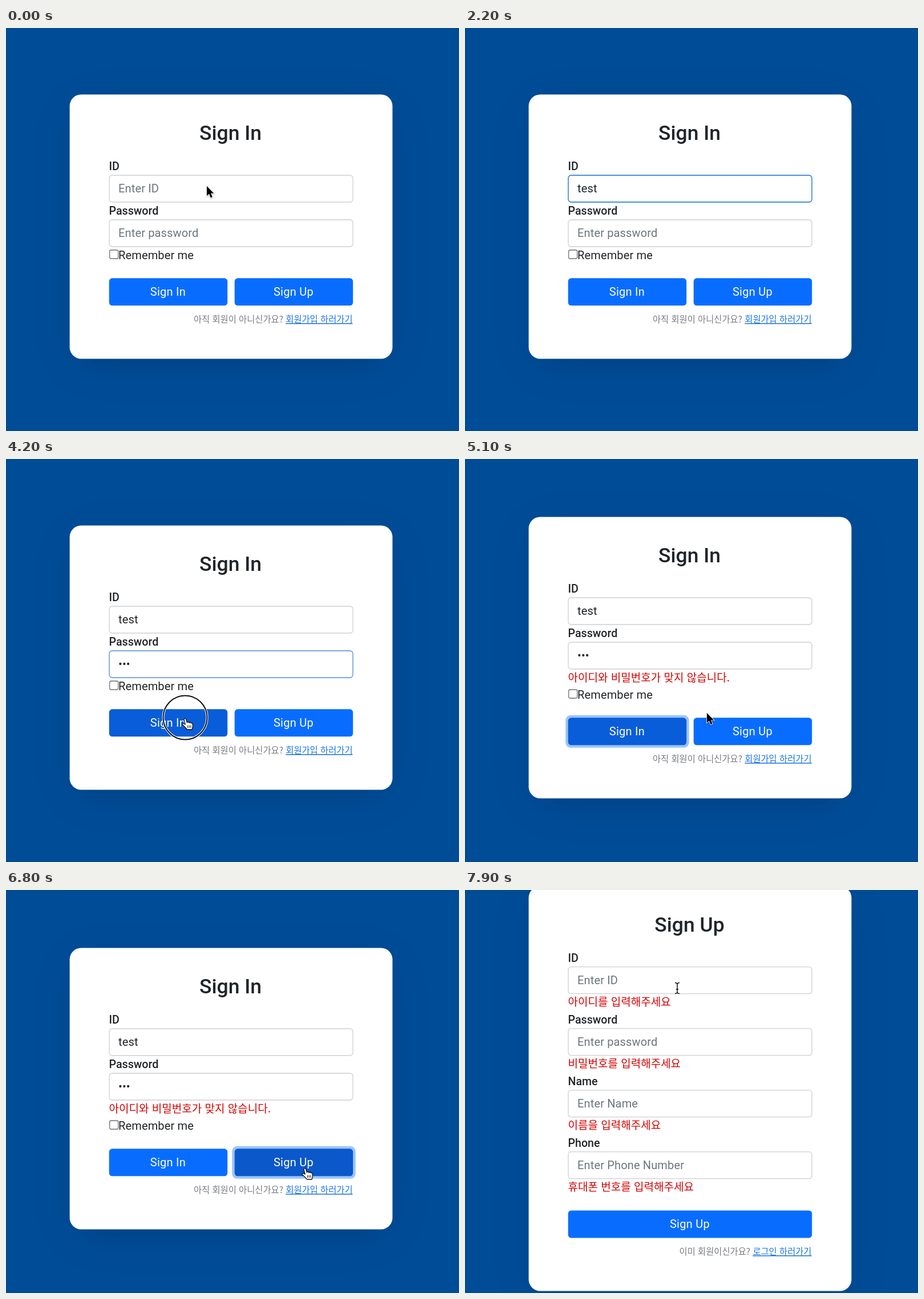
An HTML page that plays this animation: 794 px wide and 706 px high, repeating every 8000 ms.

```html
<!DOCTYPE html>
<html lang="ko">
<head>
<meta charset="utf-8">
<title>Sign In</title>
<style>
html, body { margin: 0; width: 100%; height: 100%; overflow: hidden; background: #004c97; }
svg { display: block; }
text { font: 20px Roboto, 'Noto Sans CJK KR', 'Noto Sans CJK', sans-serif; fill: #212529; letter-spacing: .15px; }
.title { font-size: 35.5px; font-weight: 500; text-anchor: middle; letter-spacing: 0; }
.label { font-size: 19.6px; font-weight: 500; letter-spacing: 0; }
.hint { fill: #6c757d; }
.error, .foot { font-family: 'Noto Sans CJK KR', 'Noto Sans CJK', 'Noto Sans CJK JP', sans-serif; letter-spacing: 0; }
.error { font-size: 19px; fill: #d60000; }
.foot { font-size: 15.35px; fill: #777b80; text-anchor: end; }
.link { fill: #1a73e8; text-decoration: underline; }
.button { fill: #fff; text-anchor: middle; letter-spacing: .25px; }
</style>
</head>
<body>
<svg id="stage" width="794" height="706" viewBox="0 0 794 706"></svg>
<script>
const LOOP = 8000, STEP = 100;
const ID_FOCUS = 100, PASS_FOCUS = 2800, IN_HOVER = 4000, IN_CLICK = 4200;
const REJECT = 4900, UP_HOVER = 6400, UP_CLICK = 6700, NEXT_PAGE = 6900;
const stage = document.getElementById('stage');

// [time, shape, x, y]: position is interpolated, shape holds until the next entry
const pointer = [
  [0, 'arrow', 352, 277], [ID_FOCUS, 'beam', 352, 277], [1100, '', 352, 277],
  [2500, 'beam', 352, 277], [PASS_FOCUS, 'beam', 291, 372], [3500, '', 291, 372],
  [3700, 'beam', 291, 372], [3900, 'arrow', 302, 410], [IN_HOVER, 'hand', 308, 442],
  [4100, 'hand', 314, 455], [4800, 'hand', 314, 455], [REJECT, 'arrow', 340, 453],
  [5100, 'arrow', 424, 445], [5300, 'arrow', 577, 403], [5400, 'arrow', 577, 403],
  [5500, 'arrow', 575, 402], [5900, 'arrow', 575, 402], [UP_HOVER, 'hand', 537, 464],
  [6600, 'hand', 524, 488], [NEXT_PAGE, 'beam', 524, 488], [7100, 'beam', 524, 488],
  [7400, 'beam', 380, 250], [7500, 'beam', 380, 250], [7900, 'beam', 372, 172],
  [LOOP, '', 372, 172]
];
const clicks = [[IN_CLICK, 314, 453], [UP_CLICK, 524, 487]];
const idKeys = [1100, 1300, 1400, 1700];
const passKeys = [3500, 3600, 3700];
const idCarets = [198, 204, 214.5, 224.5, 232];

const text = (cls, x, y, s) => `<text class="${cls}" x="${x}" y="${y}">${s}</text>`;
const typed = (keys, t) => keys.filter(k => k <= t).length;
const within = (t, a, b) => t >= a && t < b;
const ramp = (t, at) => Math.max(0, Math.min(1, (t - at + 50) / 150));
const focusLevel = (t, from, to) => t < from ? 0 : t < to ? ramp(t, from) : 1 - ramp(t, to);

function caretAt(t, from, to, keys, x) {
  const last = Math.max(from, ...keys.filter(k => k <= t));
  return within(t, from, to) && (t - last) % 1000 < 500 ? x : 0;
}

function field(y, label, { value = '', hint, focus = 0, caret, error }) {
  const frame = style => `<rect x="181" y="${y + 9}" width="427" height="47" rx="5"
    stroke-width="1.3" ${style}/>`;
  return text('label', 180.5, y, label) +
    frame('fill="#fff" stroke="#cdd0d4"') +
    frame(`fill="none" stroke="#1f78e0" stroke-opacity="${focus}"`) +
    text(value ? '' : 'hint', 197, y + 39, value || hint) +
    (caret ? `<path d="M${caret} ${y + 21}v24" stroke="#111" stroke-width="1.4"/>` : '') +
    (error ? text('error', 180.5, y + 77.5, error) : '');
}

function button(x, y, width, label, fill = '#086dff', ring) {
  return (ring ? `<rect x="${x - 4.5}" y="${y - 4.5}" width="${width + 9}" height="57" rx="9" fill="#9ac4fb"/>` : '') +
    `<rect x="${x}" y="${y}" width="${width}" height="48" rx="5.5" fill="${fill}"/>` +
    text('button', x + width / 2 - .5, y + 31, label);
}

// Pressing darkens the button, then it settles back to the hover shade
function shade(t, hover, click, leave) {
  if (!within(t, hover, leave)) return undefined;
  return within(t, click + STEP, click + 2 * STEP) ? '#0a58ca' : '#0a5dd8';
}

const footer = (y, lead, link) =>
  text('foot', 607.5, y, `${lead} <tspan class="link">${link}</tspan>`);

function card(top, title, body) {
  const box = (inset, dy, style) => `<rect x="${111.6 + inset}" y="${dy - .4}" width="${565.8 - 2 * inset}"
    height="${696.8 - 2 * top}" rx="20" style="${style}"/>`;
  return `<g transform="translate(0 ${top})">` +
    box(0, 16, 'opacity:.05;filter:blur(44px)') +
    box(30, 12, 'opacity:.06;filter:blur(14px)') +
    box(0, 0, 'fill:#fff') +
    text('title', 393.5, 79, title) + body + '</g>';
}

function signIn(t) {
  const failed = t >= REJECT;
  const idCount = typed(idKeys, t), passCount = typed(passKeys, t);
  return card(failed ? 102 : 117, 'Sign In',
    field(132, 'ID', {
      value: 'test'.slice(0, idCount), hint: 'Enter ID',
      focus: focusLevel(t, ID_FOCUS, PASS_FOCUS),
      caret: caretAt(t, ID_FOCUS + STEP, PASS_FOCUS, idKeys, idCarets[idCount])
    }) +
    field(210, 'Password', {
      value: '•'.repeat(passCount), hint: 'Enter password',
      focus: focusLevel(t, PASS_FOCUS, IN_CLICK),
      caret: caretAt(t, PASS_FOCUS, IN_CLICK, passKeys, 198 + 6.6 * passCount),
      error: failed && '아이디와 비밀번호가 맞지 않습니다.'
    }) +
    `<g transform="translate(0 ${failed ? 30 : 0})">
      <rect x="181.7" y="272" width="15" height="15" rx="2.5" fill="#fff" stroke="#707070" stroke-width="1.3"/>` +
    text('', 197, 288, 'Remember me') +
    button(180.7, 321.3, 207.5, 'Sign In', shade(t, IN_HOVER, IN_CLICK, UP_CLICK), within(t, IN_CLICK + STEP, UP_CLICK)) +
    button(400.7, 321.3, 207.5, 'Sign Up', shade(t, UP_HOVER, UP_CLICK, NEXT_PAGE), t > UP_CLICK) +
    footer(399, '아직 회원이 아니신가요?', '회원가입 하러가기') + '</g>');
}

function signUp() {
  const rows = [
    ['ID', 'Enter ID', '아이디를'], ['Password', 'Enter password', '비밀번호를'],
    ['Name', 'Enter Name', '이름을'], ['Phone', 'Enter Phone Number', '휴대폰 번호를']
  ];
  return card(-6, 'Sign Up',
    rows.map(([label, hint, what], i) =>
      field(131.7 + 108 * i, label, { hint, error: what + ' 입력해주세요' })).join('') +
    button(180.7, 567.4, 427.5, 'Sign Up') +
    footer(645, '이미 회원이신가요?', '로그인 하러가기'));
}

const beam = 'M-4-9.5Q0-9.5 0-6.5Q0-9.5 4-9.5M0-7V7M-4 9.5Q0 9.5 0 6.5Q0 9.5 4 9.5M-2 2H2';
const shapes = {
  '': '',
  arrow: `<path d="M0 0V17L4 13.4 6.8 20.2 9.8 19 7 12.5H12.2Z" stroke="#fff" stroke-width="1.6"
    paint-order="stroke" style="filter:drop-shadow(0 1px 1px #0005)"/>`,
  beam: `<path d="${beam}" fill="none" stroke="#fff" stroke-width="3"/>
    <path d="${beam}" fill="none" stroke="#111" stroke-width="1.5"/>`,
  hand: `<path d="M-2 1.4C-2-.8 1-.8 1.6 1L3.5 7C4 5 6 5 6.6 6.6L7 7.4C7.6 6 9.6 6 10.2 7.8
    11 6.8 12.8 7.4 13 9.2L13.4 13C13.4 15 12.4 16 12.2 19H3.4C2 16.5-1.5 13.5-4.6 10.8
    -5.6 9.2-3.8 7.6-2.2 8.6L.2 10Z" fill="#fff" stroke="#111" stroke-width="1.3" stroke-linejoin="round"/>
    <path d="M4.6 11.5v4.5M7.2 11.5v4.5M9.8 11.5v4.5" stroke="#111"/>`
};

function cursor(t) {
  const i = pointer.findLastIndex(p => p[0] <= t);
  const [t0, shape, x0, y0] = pointer[i], [t1, , x1, y1] = pointer[i + 1];
  const k = (t - t0) / (t1 - t0);
  return `<g transform="translate(${x0 + (x1 - x0) * k} ${y0 + (y1 - y0) * k})">${shapes[shape]}</g>`;
}

function ripple(t) {
  const hit = clicks.find(([at]) => within(t, at, at + STEP));
  if (!hit) return '';
  const ring = (color, width) => `<circle cx="${hit[1]}" cy="${hit[2]}" r="38.5"
    fill="none" stroke="${color}" stroke-width="${width}"/>`;
  return ring('#fff', 4) + ring('#111', 2);
}

let shown = -1;
function draw() {
  const t = Math.floor(performance.now() % LOOP / STEP) * STEP;
  if (t !== shown) {
    shown = t;
    stage.innerHTML = '<rect width="794" height="706" fill="#004c97"/>' +
      (t < NEXT_PAGE ? signIn(t) : signUp()) + ripple(t) + cursor(t);
  }
  requestAnimationFrame(draw);
}
draw();
</script>
</body>
</html>
```
